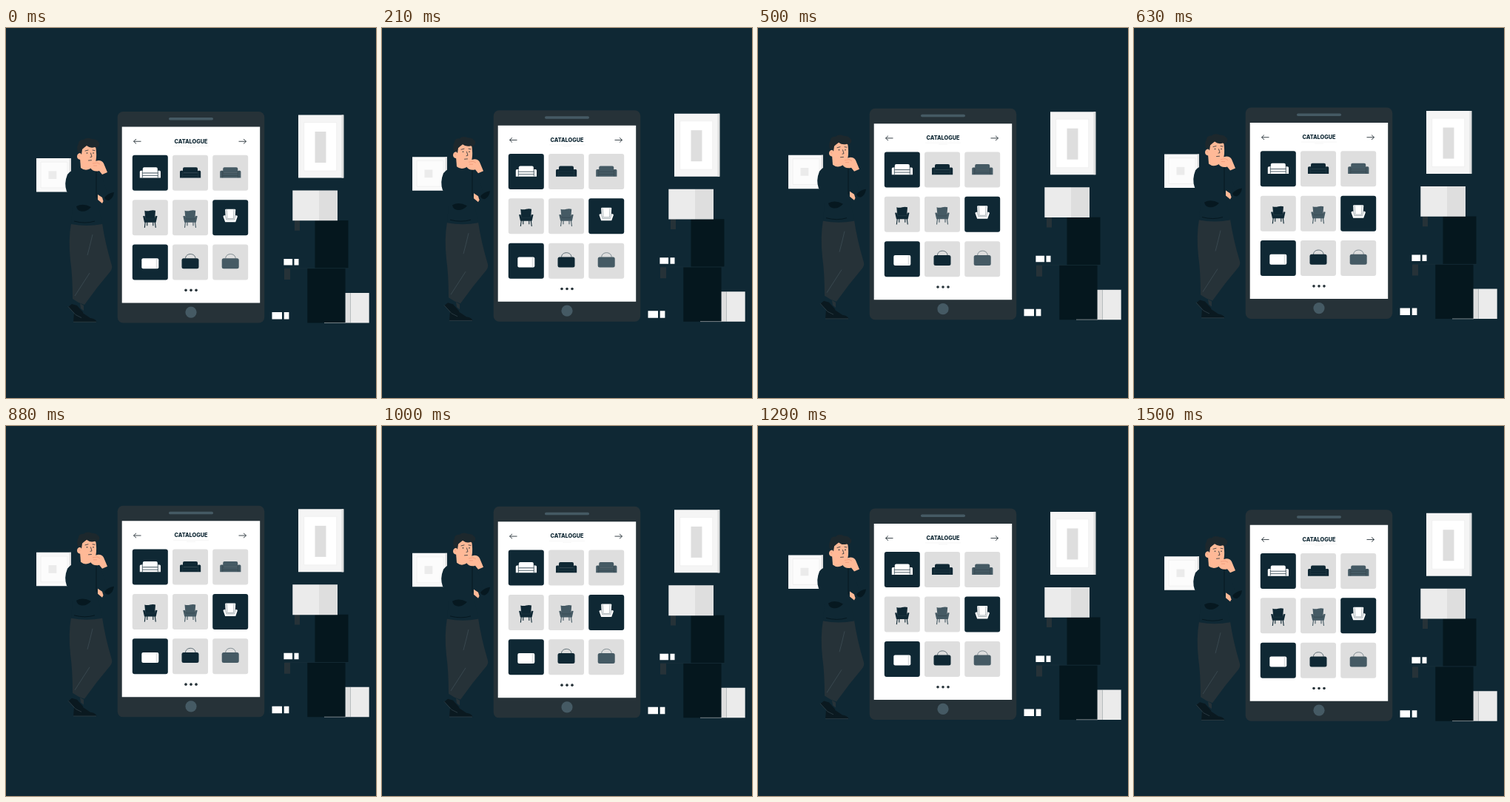
Recreate the animation shown at these times as an HTML page. Size 500 by 500 pixels, loop 1540 ms.

```html
<!DOCTYPE html>
<html lang="en">
<head>
<meta charset="utf-8">
<style>
  html, body { margin: 0; width: 100%; height: 100%; overflow: hidden; background: #0f2834; }
  svg { display: block; width: 100%; height: 100%; }
  .line { fill: none; stroke: var(--line); stroke-width: .7; }
  .legs { fill: none; stroke: currentColor; stroke-width: 1.1; }
</style>
</head>
<body>
<svg viewBox="0 0 500 500">
  <defs>
    <!-- furniture icons, centred on a 48 x 48 tile -->
    <g id="sofa" fill="currentColor">
      <path d="M-10 0V-5.500q0-2 2-2H8q2 0 2 2V0z"/>
      <path d="M-14-1.500q0-1.500 1.500-1.500h2q1.500 0 1.500 1.500V0H9.500v-1.500q0-1.500 1.500-1.500h1.700q1.500 0 1.500 1.500V6.800H-14z"/>
      <path class="line" d="M-10.500-2.500V6.500M10.500-2.500V6.500M-10.500 .3h21M-10.500 3.700h21"/>
    </g>
    <g id="chair" fill="currentColor">
      <path class="legs" d="M-6.500 6L-7.500 13.700M6.500 6L7.500 13.700M-4 6V11M4 6V11"/>
      <path d="M-7.500-9.500q3.500 1 7.500 0t7.200 0L6.300 2H-6.500z"/>
      <path d="M-9.700-2l2-.3L-6 1.500H6L7.700-2.300l2 .3L7.800 6.500H-7.800z"/>
      <path class="line" d="M-7.500-2L-5.700 2H5.700L7.500-2"/>
    </g>
    <g id="armchair" fill="currentColor">
      <path d="M-7-10.500q0-1 1-1H6q1 0 1 1L6.200 4H-6.200z"/>
      <path d="M-9.700-1.500q0-1.500 1.500-1.500h1.700L-5 2H5L6.500-3h1.700q1.500 0 1.500 1.500L7 6H-7z"/>
      <path class="line" d="M-5-11L-4.300 1.500H4.300L5-11M-7-3l1.600 6H5.400L7-3"/>
    </g>
    <g id="pouf" fill="currentColor">
      <rect x="-11.500" y="-5.300" width="23" height="14" rx="2"/>
      <path class="line" d="M8.500-5V8.500"/>
    </g>
    <g id="bag" fill="currentColor">
      <path d="M-6.500-5C-6.500-13 7-13 7-5" fill="none" stroke="currentColor" stroke-width=".6"/>
      <rect x="-11.500" y="-5.300" width="23" height="14" rx="2.500"/>
    </g>
  </defs>

  <g id="scene">
    <!-- wall pictures -->
    <path fill="#fafafa" d="M41 176h47v45.500H41z"/>
    <path fill="#dedede" d="M85.500 176H88v45.500h-2.500z"/>
    <path fill="#fcfcfc" stroke="#ebebeb" stroke-width=".7" d="M47 181h36v35H47z"/>
    <path fill="#ebebeb" d="M57.500 193.300H68.300V204H57.500z"/>
    <path fill="#f5f5f5" d="M395 117.500h61.300v85H395z"/>
    <path fill="#dedede" d="M453.500 117.500h2.800v85h-2.800z"/>
    <path fill="#fff" stroke="#ebebeb" stroke-width=".6" d="M402.700 127.500h44v65.500h-44z"/>
    <path fill="#dedede" d="M417.500 140h15v42h-15z"/>

    <!-- boxes -->
    <path fill="#05171e" d="M417.500 260h45v64.500h-45zM407.300 325h51.300v73.500h-51.300z"/>
    <path fill="#263238" d="M390 260h7v13.700h-7zM376 325h8v15h-8z"/>
    <path fill="#ebebeb" d="M387.300 219.500H423V260.300h-35.700zM465.500 358h25.200v40.500h-25.200z"/>
    <path fill="#dedede" d="M423 219.500h25V260.300h-25zM458.600 358h7v40.500h-7z"/>
    <path fill="#fff" d="M375.400 312h11.700v8.500h-11.700zM389.500 312h6v8.500h-6zM359.500 384H373v9.500h-13.500zM375.700 384h6.700v9.500h-6.700z"/>
    <path stroke="#c4c8ca" stroke-width=".6" d="M430 398.400h29"/>
    <path stroke="#1d333d" stroke-width=".5" d="M377 324.700h86"/>

    <!-- man -->
    <path fill="#0a1920" d="M89 373l7 2 8 9 2 7-3 2-12-9-7-7zM92 385l13 1 9 6q8 1 8.500 5.500H91z"/>
    <path fill="none" stroke="#35474f" stroke-width=".7" d="M84 376.500l10 11 8 4M91 397.200h31"/>
    <path fill="#263238" d="M88 264h42q4 27 13 57 1 4-2 8-18 21-35 45l-8-3-8-5q0-31-3-52-3-28 1-50z"/>
    <path fill="none" stroke="#46565e" stroke-width=".6" d="M117 279q-4 17-7 28M113 331L93 362"/>
    <path fill="#263238" d="M100 372l5 3v7l-4-3z"/>
    <path fill="#0f2834" d="M99 189q-12 3-16 9-5 12-1 23l9 8-3 36q21 4 42 0l-6-30 12-14-10-31q-14-7-27-1z"/>
    <path fill="#061820" d="M95 241q9-5 20 1-6 7-14 5.500-5-1-6-6.500zM133 229q5-6 13-7-1 8-7 11-5 0-6-4z"/>
    <path fill="none" stroke="#061820" d="M92 261q15 4 28 0M122 193v36"/>
    <path fill="#ffb997" d="M124 225l6 4 1.500 5-1.500 3-6-5z"/>
    <path fill="#ffb997" d="M100 176l1 13q6 5 13 1l4-6-5-9z"/>
    <path fill="#ffb997" d="M102 158q10-4 19 1 2 13 .5 20-2 7-8 7-8-1-12-8-5 0-5.500-4 0-5 5-5z"/>
    <path fill="#ffb997" d="M114 184q2-4 6-4l5-1q5 0 7 4l5 12-7 3-4-5q-8 2-12-4z"/>
    <path fill="none" stroke="#e98f70" stroke-width=".6" d="M117 183l6-1 4 2M118 186l5 0M98 171l2 3"/>
    <path fill="#1d282d" d="M97 168q-2-7 1-12 0-5 7-5 4-4 11-1 6 0 8 3 4 3 1 7-3 3-5 1-6 2-11-2-4 3-6 5l-1 7q-2-4-5-3z"/>
    <path fill="none" stroke="#263238" stroke-width=".8" stroke-linecap="round" d="M107 166l4-1M117 165l3 .5M114.500 169l1.500 5-2 .5M111.500 179l4-.3"/>
    <circle cx="109.500" cy="169" r=".8" fill="#263238"/>
    <circle cx="118" cy="169" r=".8" fill="#263238"/>

    <!-- tablet -->
    <rect x="150.700" y="113" width="198.500" height="285.500" rx="7.500" fill="#263238"/>
    <rect x="220" y="121" width="60" height="3.500" rx="1.700" fill="#455a64"/>
    <path fill="#fff" d="M156.700 133.500h186.500v238H156.700z"/>
    <circle cx="250" cy="384" r="7.600" fill="#455a64"/>
    <text x="250" y="155.500" text-anchor="middle" font-family="Inter, sans-serif" font-size="7.300" font-weight="800" fill="#0f2834">CATALOGUE</text>
    <path stroke="#ebebeb" stroke-width=".5" d="M226 159.500h48M244 161.500h12"/>
    <path fill="none" stroke="#263238" stroke-width=".9" d="M182.500 153.200h-10m3.500-3.200l-3.500 3.200 3.500 3.200M314.500 153.200h10m-3.500-3.200l3.500 3.200-3.500 3.200"/>
    <g fill="#263238">
      <circle cx="243" cy="354.300" r="1.800"/><circle cx="250" cy="354.300" r="1.800"/><circle cx="257" cy="354.300" r="1.800"/>
    </g>
    <g id="tiles"></g>
  </g>
</svg>
<script>
  const NAVY = '#0f2834', SLATE = '#455a64', GREY = '#dedede', WHITE = '#fff';
  const PERIOD = 1540, RISE = 6.7;
  const scene = document.getElementById('scene');

  const tile = (icon, color, back, line, i) => {
    const x = 194.8 + 54.2 * (i % 3), y = 195.7 + 60.4 * Math.floor(i / 3);
    return `<g transform="translate(${x} ${y})" style="color:${color};--line:${line}">
      <rect x="-24" y="-24" width="48" height="48" rx="3" fill="${back}"/><use href="#${icon}"/></g>`;
  };
  document.getElementById('tiles').innerHTML = [
    ['sofa', WHITE, NAVY, NAVY], ['sofa', NAVY, GREY, '#203741'], ['sofa', SLATE, GREY, '#35474f'],
    ['chair', NAVY, GREY, '#203741'], ['chair', SLATE, GREY, '#35474f'], ['armchair', WHITE, NAVY, '#8a979c'],
    ['pouf', WHITE, NAVY, '#c4c8ca'], ['bag', NAVY, GREY, NAVY], ['bag', SLATE, GREY, SLATE]
  ].map((args, i) => tile(...args, i)).join('');

  // The whole scene floats up and down at constant speed.
  const start = performance.now();
  function draw(now) {
    const phase = (Math.max(0, now - start) + 30) / PERIOD % 1;
    const y = 0.3 - RISE * (1 - Math.abs(1 - 2 * phase));
    scene.setAttribute('transform', `translate(0 ${y.toFixed(3)})`);
    requestAnimationFrame(draw);
  }
  draw(start);
</script>
</body>
</html>
```
